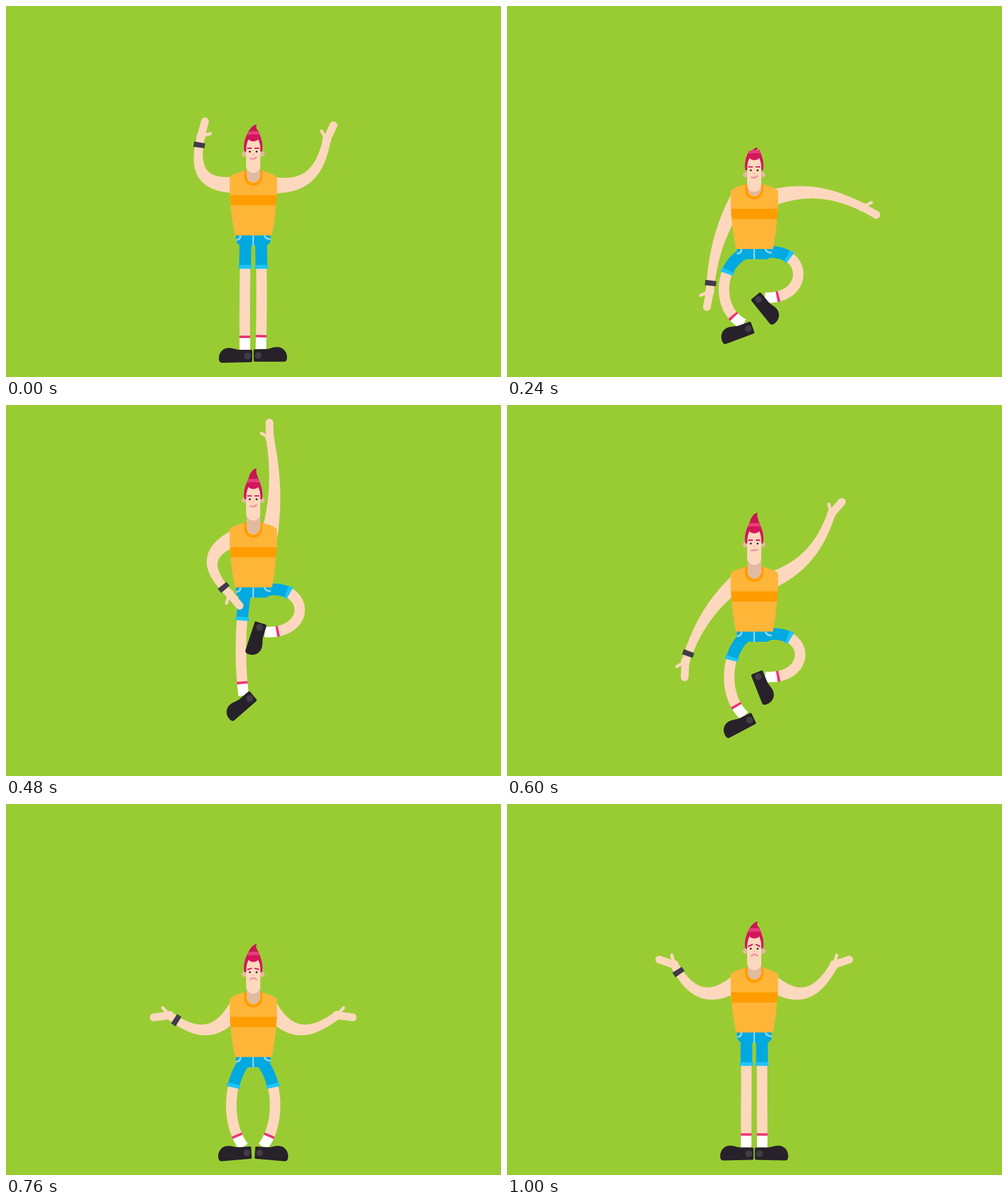
An HTML page with a canvas that plays this animation: 800x600 px, repeating every 1.84 s.

```html
<!DOCTYPE html>
<html lang="en">
<head>
<meta charset="utf-8">
<title>Jump</title>
<style>
  html, body { margin: 0; width: 100%; height: 100%; overflow: hidden; background: #9c3; }
  canvas { display: block; width: 800px; height: 600px; }
</style>
</head>
<body>
<canvas id="stage" width="800" height="600"></canvas>
<script>
const ctx = document.getElementById('stage').getContext('2d');
const LOOP = 1840, STEP = 40, LAST = 1000;
const MIRROR = 799;                      // twice the x of the body's axis
const UPPER = 78, FORE = 84, LEG = 180;  // limb lengths
const GREEN = '#9c3', SKIN = '#fdd8be', SHADE = '#e1bb9f', SHIRT = '#ffb538', TRIM = '#ff9d00',
      DENIM = '#00a9df', CUFF = '#1fc4f7', SEAM = '#8ad6ec', PINK = '#ee3378',
      HAIR = '#d3165b', HAIR_TOP = '#c8174f', HAIR_BAND = '#e83c7f',
      SHOE = '#272229', DARK = '#413c48';

// One side of a pose: angles of upper arm, forearm and hand, then foot x, y and angle.
// Sides are given as seen on the right; the left one is mirrored when drawn.
const pose = (left, right = left) => [...left, ...right];
const cheer  = pose([3, -103, -105, 413, 556, 0], [7, -79, -65, 412, 555, -1]);
const crouch = pose([87, 49, 46, 418, 550, -1], [41, 120, 123, 416, 551, 8]);
const reach  = pose([25, 131, 120, 415, 470, 45], [-89, -89, -87, 418, 374, 102]);
const hang   = pose([24, 134, 130, 415, 470, 40], [-78, -100, -92, 418, 367, 107]);
const slump  = pose([66, -26, 20, 416, 554, 5]);
const shrug  = pose([36, -61, -19, 412.5, 555.5, 0]);

const POSES = [[0, cheer], [120, crouch], [170, crouch], [320, reach], [480, hang],
  [540, hang], [680, slump], [890, shrug]];
const HEIGHT = [[0, [306]], [140, [401]], [150, [401]], [350, [228]], [460, [228]],
  [710, [352]], [900, [304.5]]];
const STRETCH = [[150, [0]], [260, [-9]], [300, [-9]], [460, [7]], [680, [7]], [800, [0]]];

const ease = u => Math.sin(Math.min(1, Math.max(0, u)) * Math.PI / 2) ** 2;
const ramp = (t, from, to) => ease((t - from) / (to - from));
const mix = (a, b, u) => a + (b - a) * u;

function tween(keys, t) {
  let i = 0;
  while (i < keys.length - 2 && t >= keys[i + 1][0]) i++;
  const [t0, a] = keys[i], [t1, b] = keys[i + 1];
  const u = ramp(t, t0, t1);
  return a.map((v, k) => mix(v, b[k], u));
}

const vec = (x, y) => ({ x, y });
const add = (p, q, k = 1) => vec(p.x + q.x * k, p.y + q.y * k);
const lerp = (p, q, u) => vec(mix(p.x, q.x, u), mix(p.y, q.y, u));
const polar = (deg, r = 1) => vec(r * Math.cos(deg * Math.PI / 180), r * Math.sin(deg * Math.PI / 180));
const line = pts => 'M' + pts.map(p => p.x + ',' + p.y).join('L');

// Points along a cubic curve, each with its arc length.
function curve(a, b, c, d, n = 60) {
  const pts = [];
  let len = 0;
  for (let i = 0; i <= n; i++) {
    const u = i / n, bc = lerp(b, c, u);
    const p = lerp(lerp(lerp(a, b, u), bc, u), lerp(bc, lerp(c, d, u), u), u);
    if (i) len += Math.hypot(p.x - pts[i - 1].x, p.y - pts[i - 1].y);
    pts.push({ ...p, len });
  }
  return pts;
}

function pointAt(pts, len) {
  let i = 1;
  while (i < pts.length - 1 && pts[i].len < len) i++;
  const a = pts[i - 1], b = pts[i];
  return lerp(a, b, (len - a.len) / (b.len - a.len));
}

function stroke(path, color, width, cap = 'butt') {
  ctx.strokeStyle = color;
  ctx.lineWidth = width;
  ctx.lineCap = cap;
  ctx.stroke(new Path2D(path));
}

function fill(path, color) {
  ctx.fillStyle = color;
  ctx.fill(new Path2D(path));
}

function dot(x, y, r, color) {
  ctx.fillStyle = color;
  ctx.beginPath();
  ctx.arc(x, y, r, 0, 7);
  ctx.fill();
}

function section(pts, from, to, color, width) {
  const inner = pts.filter(p => p.len > from && p.len < to);
  stroke(line([pointAt(pts, from), ...inner, pointAt(pts, to)]), color, width);
}

function within(setup, draw) {
  ctx.save();
  setup();
  draw();
  ctx.restore();
}

const shifted = (y, draw) => within(() => ctx.translate(0, y), draw);
const mirrored = draw => within(() => ctx.transform(-1, 0, 0, 1, MIRROR, 0), draw);

// The closer the foot comes to the hip, the further the knee bows out.
function drawLeg(body, [, , , x, y, angle]) {
  const hip = vec(412, body + 71), foot = vec(x, y);
  const dist = Math.hypot(x - hip.x, y - hip.y);
  const along = vec((x - hip.x) / dist, (y - hip.y) / dist);
  const out = vec(along.y, -along.x);
  const bow = .7 * Math.max(0, LEG - dist), reachLen = .65 * (dist - 85);
  const c1 = add(add(hip, along, reachLen), out, bow);
  const c2 = add(add(foot, along, -reachLen), out, bow);
  const pts = curve(hip, c1, c2, foot), end = pts[pts.length - 1].len;

  section(pts, 40, end - 21, SKIN, 17);
  section(pts, end - 20, end, '#fff', 17);
  section(pts, end - 23, end - 19, PINK, 17.5);
  section(pts, 0, 44, DENIM, 19);
  section(pts, 42, 48, CUFF, 21.5);
  within(() => {
    ctx.translate(x, y);
    ctx.rotate(angle * Math.PI / 180);
  }, () => {
    fill('M-10 0Q-12 0-12 2V18Q-12 20-10 20L37 21Q42 21 42 14C42 4 35-3 26-3C18-3 15 0 8 0Z', SHOE);
    dot(-4.5, 10, 5.5, DARK);
  });
}

function drawArm([upper, fore, hand], band) {
  const shoulder = vec(425, -17);
  const elbow = add(shoulder, polar(upper, UPPER));
  const wrist = add(elbow, polar(fore, FORE));
  const pts = curve(shoulder, lerp(shoulder, elbow, .7), lerp(wrist, elbow, .7), wrist);
  const n = pts.length - 1, left = [], right = [];
  pts.forEach((p, i) => {
    const a = pts[Math.max(0, i - 1)], b = pts[Math.min(n, i + 1)];
    const r = (6.5 + 7 * (1 - i / n) ** 1.4) / Math.hypot(b.x - a.x, b.y - a.y);
    const side = vec(a.y - b.y, b.x - a.x);
    left.push(add(p, side, r));
    right.unshift(add(p, side, -r));
  });
  fill(line([...left, ...right]) + 'Z', SKIN);
  stroke(line([wrist, add(wrist, polar(hand - 57, 16))]), SKIN, 5, 'round');
  stroke(line([wrist, add(wrist, polar(hand, 25.5))]), SKIN, 12.5, 'round');
  dot(wrist.x, wrist.y, 7.3, SKIN);
  if (band) section(pts, pts[n].len - 18, pts[n].len - 9.5, DARK, 18);
}

function drawShorts() {
  fill('M371.5 60V72Q373 80 380 81.5H420Q427 80 428 72V60Z', DENIM);
  stroke('M399.5 62V82', SEAM, 2.6);
  stroke('M379 64Q379.5 72 371.5 72.5M417.5 65Q420 71.5 428 71', SEAM, 3);
}

function drawShirt() {
  fill('M386-40C377-37 366-35 361.5-29V-8Q362 25 370 65H430Q437 25 438-8V-29C433-35 422-37 413-40Z', SHIRT);
  fill('M362 0H437.8L436.5 16.5H363.3Z', TRIM);
  stroke('M387-40V-30A12.5 12.5 0 0 0 412-30V-40', TRIM, 4.5);
}

function drawHead(stretch, frown, worry) {
  const tip = -78 - stretch * .85, ear = -30 - stretch * .35;
  dot(385.3, ear, 4.3, SHADE);
  dot(413.7, ear, 4.3, SHADE);
  fill('M388-56H411V-11A11.5 11.5 0 0 1 388-11Z', SKIN);

  const hair = new Path2D(`M385-35C383-47 387-58 391.5-66C394,${tip + 9} 398,${tip + 1} 405,${tip}
    C403,${tip + 5} 405,${tip + 8} 407.5-68C412-58 416-47 414-35Q412.5-32.5 411-35
    C411.5-43 410-49 407.5-54C405-49.5 394.5-49.5 392-54C389.5-49 388-43 388.5-35Q387-32.5 385-35Z`);
  within(() => ctx.clip(hair), () => {
    fill('M380-90H420V-30H380Z', HAIR);
    fill('M380-90H420V-63Q400-67 380-63Z', HAIR_TOP);
    stroke('M380-62Q400-67 420-62', HAIR_BAND, 5.5);
  });

  const outer = -39.5 + worry * 1.7, inner = -39.5 - worry * 1.2;
  stroke(`M390.5,${outer}L396.5,${inner}M402.5,${inner}L408.5,${outer}`, HAIR, 2.1, 'round');
  dot(394, -34, 1.5, '#1d1a20');
  dot(405, -34, 1.5, '#1d1a20');
  stroke('M398-29.5Q399.5-28 401-29.5', '#f4b999', 1.2, 'round');
  const bend = (a, b) => mix(a, b, frown);
  stroke(`M395,${bend(-23, -22.5)}Q${bend(401, 399.5)},${bend(-20.5, -27)} 404.5,${bend(-25, -22.5)}`,
    '#f3959f', 2.7, 'round');
}

function draw(t) {
  const [body] = tween(HEIGHT, t), [stretch] = tween(STRETCH, t);
  const now = tween(POSES, t), left = now.slice(0, 6), right = now.slice(6);
  const chin = -36.5 - stretch;

  ctx.fillStyle = GREEN;
  ctx.fillRect(0, 0, 800, 600);
  mirrored(() => drawLeg(body, left));
  drawLeg(body, right);
  shifted(body, () => {
    drawShorts();
    mirrored(() => drawArm(left, true));
    drawArm(right, false);
    drawShirt();
    fill(`M389,${chin - 12}H411V-32A11 11 0 0 1 389-32Z`, SHADE);
  });
  shifted(body + chin, () => drawHead(stretch, ramp(t, 540, 680), ramp(t, 680, 840)));
}

const start = performance.now();
function tick() {
  const t = (performance.now() - start) % LOOP;
  draw(Math.min(LAST, Math.floor(t / STEP) * STEP));
  requestAnimationFrame(tick);
}
tick();
</script>
</body>
</html>
```
